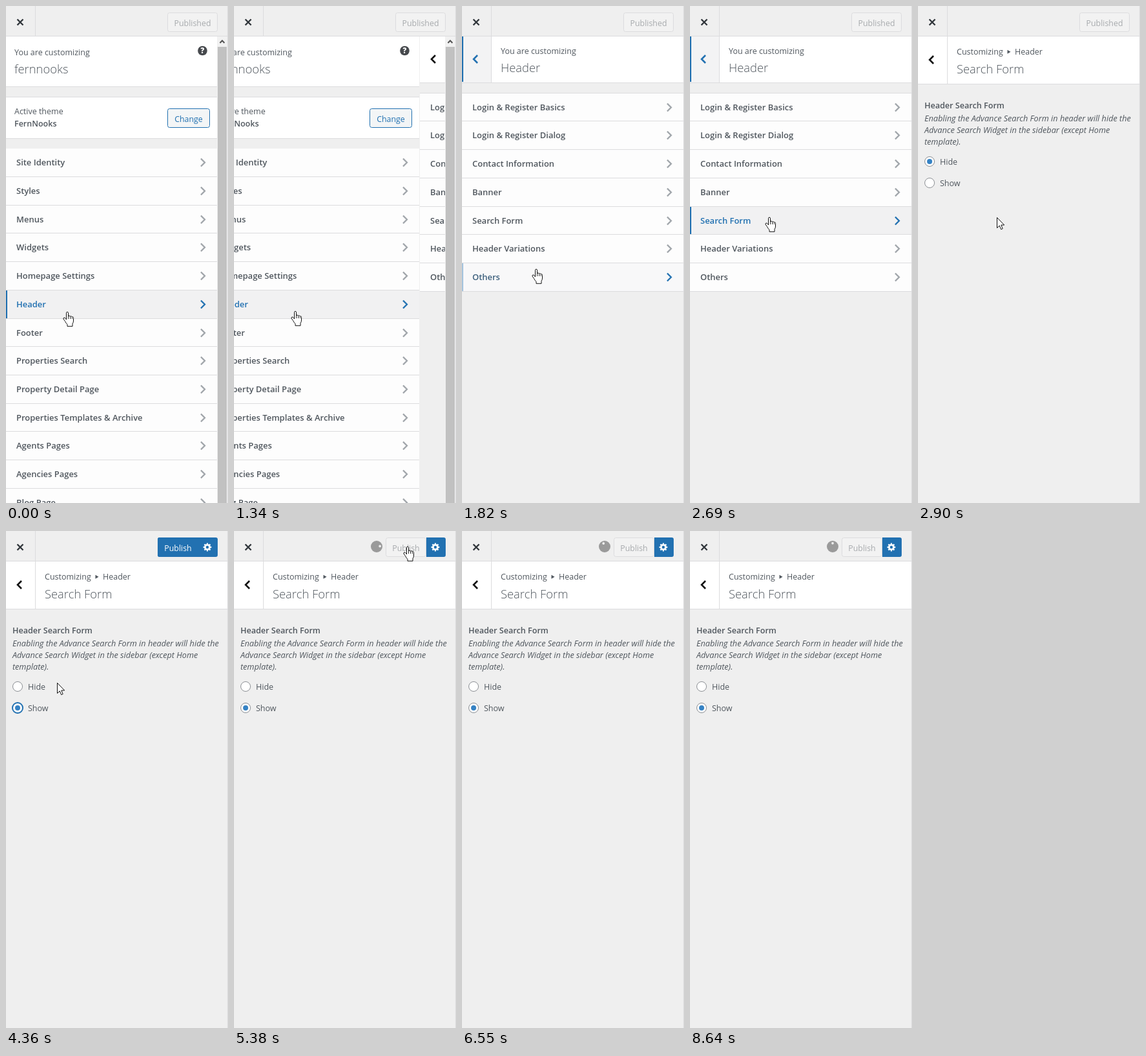
Animation of 344 by 767 pixels, one loop 8.74 s. Source, as an HTML page:

```html
<!DOCTYPE html>
<html lang="en">
<head>
<meta charset="utf-8">
<title>Customizer walkthrough</title>
<style>
  html, body { margin: 0; width: 100%; height: 100%; overflow: hidden; background: #efefef; }
  svg { display: block; width: 100%; height: 100%; }
  text { font-family: "Open Sans", "Noto Sans", sans-serif; white-space: pre; }
</style>
</head>
<body>
<svg id="stage" viewBox="0 0 344 767" xmlns="http://www.w3.org/2000/svg"></svg>
<script>
const LOOP = 8740, ROW = 43.73, NARROW = 327, WIDE = 343;
const BLUE = '#2271b1', GREY = '#50575e', LINE = '#dcdcde', PAGE = '#efefef';

// Markup helpers
const rect = (x, y, w, h, fill, more = '') =>
  `<rect x="${x}" y="${y}" width="${w}" height="${h}" fill="${fill}" ${more}/>`;
const text = (x, y, s, size = 12.5, fill = GREY, more = '') =>
  `<text x="${x}" y="${y}" font-size="${size}" fill="${fill}" ${more}>${s.replace(/&/g, '&amp;')}</text>`;
const stroke = (d, color, width, more = '') =>
  `<path d="${d}" fill="none" stroke="${color}" stroke-width="${width}" ${more}/>`;
const group = (id, body) => `<g id="${id}">${body}</g>`;
const button = (x, w, label, border, fill, color, y = 10) =>
  rect(x + .5, y + .5, w - 1, 29, fill, `rx="3" stroke="${border}"`) +
  text(x + w / 2, y + 20.5, label, 12.4, color, 'text-anchor="middle"');
const backChevron = (y, color) => stroke(`M24 ${y - 6}l-6 6 6 6`, color, 2.6);
const BOLD = 'font-weight="600"', LIGHT = 'font-weight="300"';

function rows(id, labels, top, width) {
  return labels.map((label, i) => {
    const y = Math.floor(top + ROW * i) + 1;
    const end = Math.floor(top + ROW * (i + 1));
    return group(id + i,
      rect(0, y, width, end - y, '#fdfdfd') +
      rect(0, y, 2, end - y, BLUE, 'opacity="0"') +
      text(16, y + 25.5, label, 12.97, GREY, BOLD) +
      stroke(`M${width - 25} ${y + 15.5}l6 6-6 6`, '#a0a5aa', 2.3) +
      rect(0, end, width, 1, LINE));
  }).join('');
}

const heading = (bottom, chevronY) =>
  rect(0, 47, WIDE, bottom - 47, '#fff') +
  rect(0, bottom, WIDE, 1, LINE) +
  rect(45, 47, 1, bottom - 47, LINE) +
  backChevron(chevronY, '#111');

const radio = (id, y, label) => group(id,
  `<circle cx="18" cy="${y}" fill="#fff"/><circle cx="18" cy="${y}" r="4" fill="#3582c4"/>`) +
  text(34, y + 4.8, label);

const themePanel =
  rect(0, 47, NARROW, 720, PAGE) +
  rect(0, 47, NARROW, 77, '#fff') + rect(0, 124, NARROW, 1, LINE) +
  text(13, 76, 'You are customizing') + text(13, 104, 'fernnooks', 18.4, GREY, LIGHT) +
  '<circle cx="304.5" cy="69" r="7.3" fill="#46494d"/>' +
  text(304.5, 73.3, '?', 11.5, '#fff', 'font-weight="800" text-anchor="middle"') +
  rect(0, 140, NARROW, 65, LINE) + rect(0, 141, NARROW, 63, '#fff') +
  text(13, 167, 'Active theme') + text(13, 186, 'FernNooks', 12.5, GREY, BOLD) +
  button(250, 66, 'Change', BLUE, '#f3f5f6', BLUE, 158) +
  rows('main', ['Site Identity', 'Styles', 'Menus', 'Widgets', 'Homepage Settings', 'Header',
    'Footer', 'Properties Search', 'Property Detail Page', 'Properties Templates & Archive',
    'Agents Pages', 'Agencies Pages', 'Blog Page'], 219.65, NARROW);

const headerPanel =
  rect(0, 47, WIDE, 720, PAGE) + heading(118, 82) +
  group('backFocus', rect(0, 47, 45, 71, '#f3f3f4') + rect(0, 47, 2, 70, BLUE) + backChevron(82, BLUE)) +
  text(60, 74, 'You are customizing') + text(60, 102, 'Header', 18.4, GREY, LIGHT) +
  rect(0, 134, WIDE, 1, LINE) +
  rows('sub', ['Login & Register Basics', 'Login & Register Dialog', 'Contact Information', 'Banner',
    'Search Form', 'Header Variations', 'Others'], 134.2, WIDE);

const formPanel =
  rect(0, 47, WIDE, 720, PAGE) + heading(120, 83) +
  text(60, 75, 'Customizing') + `<path d="M138.5 67.8l5 3-5 3z" fill="${GREY}"/>` + text(150, 75, 'Header') +
  text(60, 104, 'Search Form', 18.4, GREY, LIGHT) +
  text(10, 158, 'Header Search Form', 12.6, GREY, BOLD) +
  ['Enabling the Advance Search Form in header will hide the',
   'Advance Search Widget in the sidebar (except Home', 'template).']
    .map((s, i) => text(10, 178 + 18 * i, s, 12.7, GREY, 'font-style="italic"')).join('') +
  radio('hide', 240, 'Hide') + radio('show', 273, 'Show');

const gear =
  '<g fill="none" stroke="#fff"><circle cx="312" cy="25" r="3.6" stroke-width="2.8"/>' +
  '<circle cx="312" cy="25" r="5.4" stroke-width="2" pathLength="16" stroke-dasharray="1" stroke-dashoffset=".5"/></g>';

const topBar =
  rect(0, 0, 344, 46, PAGE) + rect(0, 46, 344, 1, LINE) + rect(45, 0, 1, 46, LINE) +
  stroke('M17.5 20.5l9 9m0-9l-9 9', '#32373c', 2.4) +
  group('published', button(250, 78, 'Published', LINE, '#f2f2f2', '#a7aaad')) +
  group('publish',
    rect(233.5, 8.5, 66, 33, 'none', `id="pressRing" rx="4" stroke="${BLUE}"`) +
    rect(235, 10, 93, 30, BLUE, 'rx="3"') +
    group('active', rect(235, 10, 63, 30, BLUE, 'id="face" rx="3"') +
      text(266.5, 30.5, 'Publish', 12.4, '#fff', 'text-anchor="middle"')) +
    group('disabled', rect(235, 10, 63, 30, PAGE) + button(235, 63, 'Publish', LINE, '#f2f2f2', '#a7aaad')) +
    gear) +
  group('spinner', '<circle cx="221" cy="24" r="9" fill="#9a9a9a"/>' +
    '<circle id="bead" cx="221" cy="18.8" r="1.9" fill="#eee"/>');

const scrollbar =
  rect(327, 47, 16, 720, '#f1f1f1') + rect(328, 63, 14, 704, '#c1c1c1') +
  stroke('M331.5 57l3.5-3.5 3.5 3.5', '#505050', 2);

const hand =
  '<path d="M5.5 13V2.7a1.5 1.5 0 0 1 3 0V8q.2-1 1.4-1t1.5 1.4q.3-.9 1.4-.7t1.4 1.5q.3-.8 1.3-.5t1 1.6V15' +
  'q0 2.5-1.5 4.5V23.3H7V20.5Q5 18.5 3.5 15.5L1 12q-.4-1.6 1-2t2.5 1.5z" fill="#fff" stroke="#111"/>' +
  stroke('M8.5 8v4m3-3.5v3.5m2.8-2.5v2.5', '#111', .9);
const arrow = '<path d="M.5.5V16.5L4.3 13 6.7 18.7 9.2 17.6 6.8 12H11.7Z" fill="#fff" stroke="#111"/>';

document.getElementById('stage').innerHTML =
  rect(0, 0, 344, 767, PAGE) +
  group('panel1', themePanel) + group('panel2', headerPanel) + group('panel3', formPanel) +
  group('scrollbar', scrollbar) + topBar + rect(343, 0, 1, 767, LINE) +
  group('hand', hand) + group('arrow', arrow);

// Time helpers
const $ = id => document.getElementById(id);
const set = (id, name, value) => $(id).setAttribute(name, value);
const show = (id, visible) => set(id, 'visibility', visible ? 'visible' : 'hidden');
const move = (id, x, y = 0) => set(id, 'transform', `translate(${Math.round(x)} ${Math.round(y)})`);
const ramp = (t, start, length) => Math.min(1, Math.max(0, (t - start) / length));
const ease = p => p < .5 ? 4 * p ** 3 : 1 - 4 * (1 - p) ** 3;
const mix = (a, b, p) => `rgb(${a.map((v, i) => Math.round(v + (b[i] - v) * p))})`;

// Pointer hot spot: time, x, y
const POINTER = [
  [0, 94, 472], [960, 94, 472], [960, 94, 471], [1710, 94, 471], [1820, 114, 406], [1930, 119, 366],
  [2060, 122, 348], [2180, 122, 326], [3000, 122, 326], [3450, 26, 278], [3680, 17, 275],
  [4180, 17, 275], [4360, 79, 234], [4800, 262, 30], [4980, 268, 24], [5560, 268, 24],
  [6000, 280, 515], [6240, 279, 775], [LOOP, 279, 775]
];
function pointerAt(t) {
  const i = POINTER.findIndex(p => p[0] > t);
  const [t0, x0, y0] = POINTER[i - 1], [t1, x1, y1] = POINTER[i];
  const p = (t - t0) / (t1 - t0);
  return [x0 + (x1 - x0) * p, y0 + (y1 - y0) * p];
}

function hover(id, t, enter, leave) {
  const p = ramp(t, enter, 150) - ramp(t, leave, 150);
  const [face, edge, label, chevron] = $(id).children;
  face.setAttribute('fill', mix([253, 253, 253], [241, 241, 242], p));
  edge.setAttribute('opacity', p);
  label.setAttribute('fill', mix([80, 87, 94], [34, 113, 177], p));
  chevron.setAttribute('stroke', t >= enter && t < leave ? BLUE : '#a0a5aa');
}

function setRadio(id, checked, focused) {
  const [ring, dot] = $(id).children;
  ring.setAttribute('r', focused ? 8 : 7.5);
  ring.setAttribute('stroke', focused ? BLUE : '#8c8f94');
  ring.setAttribute('stroke-width', focused ? 2 : 1);
  dot.setAttribute('visibility', checked ? 'visible' : 'hidden');
}

function render(t) {
  const first = ease(ramp(t, 1283.5, 180)), second = ease(ramp(t, 2700, 180));
  move('panel1', -NARROW * first);
  move('panel2', NARROW * (1 - first) - WIDE * second + (first < 1 ? 1 : 0));
  move('panel3', WIDE * (1 - second));
  show('panel3', t >= 2700);
  show('scrollbar', t < 1464);
  show('backFocus', t >= 1464);

  hover('main5', t, -200, LOOP);
  hover('sub6', t, 1762, 1847);
  hover('sub5', t, 1847, 2045);
  hover('sub4', t, 2045, LOOP);

  const chosen = t >= 3890, saving = t >= 5250;
  setRadio('hide', !chosen, false);
  setRadio('show', chosen, chosen && t < 5130);
  show('published', !chosen);
  set('publish', 'opacity', ramp(t, 3880, 140));
  set('face', 'fill', t >= 4790 ? '#135e96' : BLUE);
  set('pressRing', 'opacity', t >= 5130 && !saving ? 1 : 0);
  show('active', !saving);
  show('disabled', saving);
  show('spinner', saving);
  set('bead', 'transform', `rotate(${(t - 8640) / 684 * 360} 221 24)`);

  const [x, y] = pointerAt(t);
  const overLink = t < 1464 || (t < 2880 && y < 440) || (t > 4180 && y < 40);
  show('hand', overLink);
  show('arrow', !overLink);
  move('hand', x - 6, y - 1);
  move('arrow', x, y);
}

// The picture advances on a clock of hundredths of a second
const start = performance.now();
function frame() {
  const elapsed = (performance.now() - start) % LOOP;
  render(Math.floor(elapsed / 10) * 10);
  requestAnimationFrame(frame);
}
frame();
</script>
</body>
</html>
```
